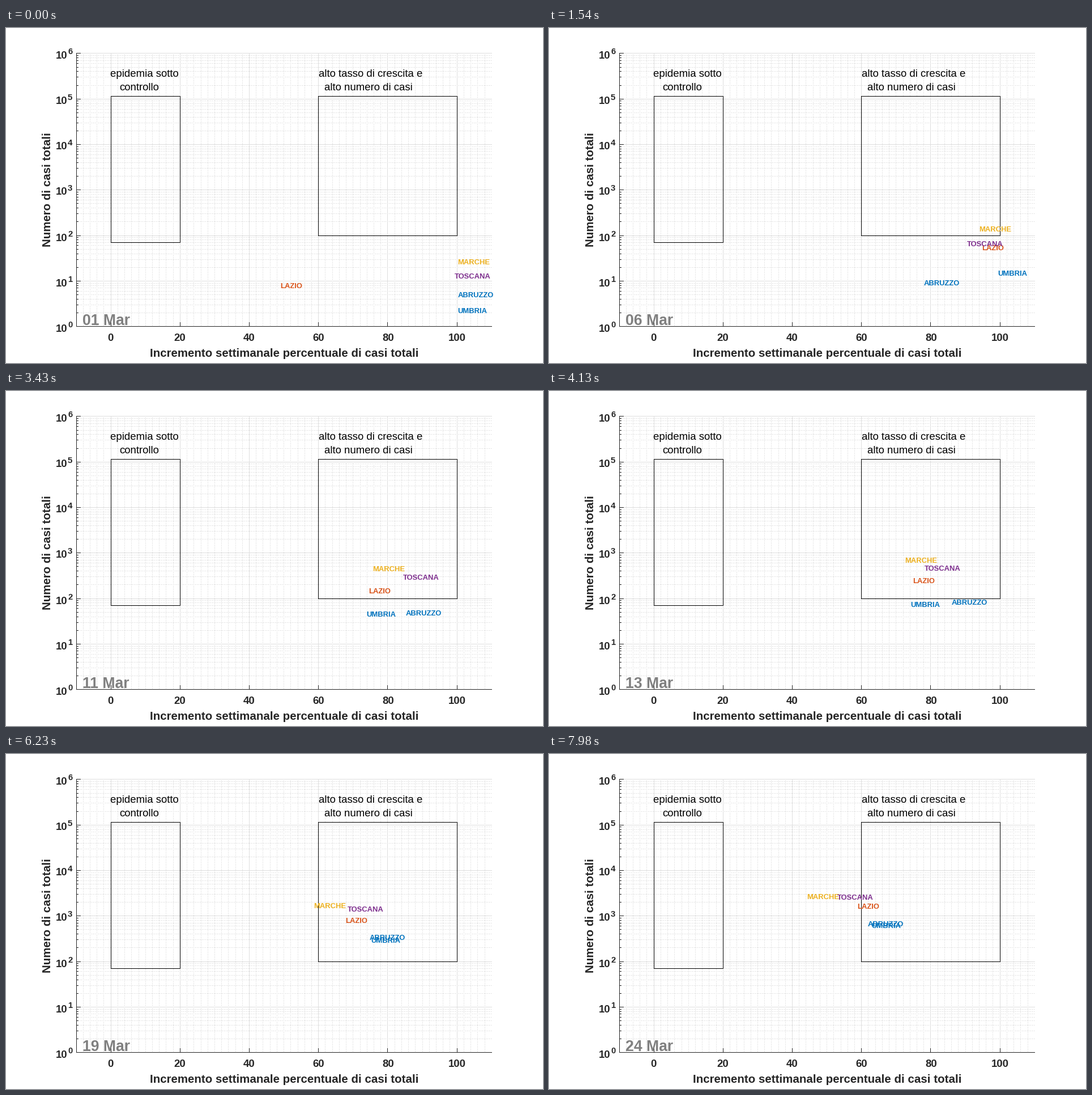
These frames come from a looping animation (948 px wide and 591 px high, 8 s). A matplotlib script:

```python
import math

import numpy as np
import matplotlib.pyplot as plt
from matplotlib.animation import FuncAnimation

W, H, DPI = 948, 591, 64
STEP = 70            # ms between position updates
TICK = 20            # ms per animation frame
LOOP = 8000          # ms per loop
STEPS_PER_DAY = 5

INK = 38
TEXT, LABEL, NAME, DATE = 18.67, 20.55, 13, 26.67   # font sizes in pixels


def px_x(v):
    return math.floor(185.15 + 6.11 * v)


def px_y(cases):
    return round(526.1 - 80.27 * math.log10(cases))


LEFT, RIGHT = px_x(-10), px_x(110)
TOP, BOTTOM = px_y(1e6), px_y(1)


def draw_chart():
    """Grid, axes and the two outlined zones as one RGB picture."""
    img = np.full((H, W, 3), 255, np.uint8)

    def hline(y, shade, x0=LEFT, x1=RIGHT, gap=1):
        img[y, x0:x1 + 1:gap] = shade

    def vline(x, shade, y0=TOP, y1=BOTTOM, gap=1):
        img[y0:y1 + 1:gap, x] = shade

    def box(x0, x1, low, high):
        l, r, t, b = px_x(x0), px_x(x1), px_y(high), px_y(low)
        for y in (t, b):
            hline(y, 0, l, r)
        for x in (l, r):
            vline(x, 0, t, b)

    minor = [m * 10 ** e for e in range(6) for m in range(2, 10)]
    decades = [10 ** e for e in range(7)]
    majors = range(0, 101, 20)

    for v in range(-8, 110, 2):
        vline(px_x(v), 205, gap=3)
    for c in minor:
        hline(px_y(c), 205, gap=3)
    for v in majors:
        vline(px_x(v), 222)
    for c in decades:
        hline(px_y(c), 222)

    box(0, 20, 70, 1.14e5)
    box(60, 100, 100, 1.14e5)

    vline(LEFT, INK)
    hline(BOTTOM, INK)
    for v in majors:
        vline(px_x(v), INK, BOTTOM - 7)
    for c in decades:
        hline(px_y(c), INK, LEFT, LEFT + 7)
    for c in minor:
        hline(px_y(c), INK, LEFT, LEFT + 3)
    return img


fig = plt.figure(figsize=(W / DPI, H / DPI), dpi=DPI, facecolor="white")
fig.figimage(draw_chart(), 0, 0, origin="upper")


def at(x, y):
    """Pixel position, y counted from the top, as figure fractions."""
    return x / W, 1 - y / H


def put(x, y, s, size, color=(INK / 255,) * 3, weight="bold", ha="left", **kw):
    return fig.text(*at(x, y), s, fontsize=size * 72 / DPI, color=color,
                    family="Liberation Sans", weight=weight, ha=ha,
                    va="baseline", **kw)


for v in range(0, 101, 20):
    put(184.8 + 6.12 * v, 552, str(v), TEXT, ha="center")
for e in range(7):
    y = px_y(10 ** e)
    put(88, y + 9.5, "10", TEXT)
    put(109, y + 2, str(e), 0.8 * TEXT)

put(491, 580.5, "Incremento settimanale percentuale di casi totali", LABEL,
    ha="center")
put(79, 285, "Numero di casi totali", LABEL, ha="center", rotation=90,
    rotation_mode="anchor")

for x, first, indent, second in (
        (184.5, "epidemia sotto", 15.5, "controllo"),
        (552, "alto tasso di crescita e", 10.4, "alto numero di casi")):
    put(x, 86.5, first, TEXT, "black", "normal")
    put(x + indent, 110.5, second, TEXT, "black", "normal")


class Path:
    """Smooth path through points reached at the shared key steps."""

    KEYS = np.array([0, 22, 37, 49, 69, 89, 114], float)

    def __init__(self, *points):
        self.p = np.array(points, float)
        self.m = np.gradient(self.p, self.KEYS, axis=0)

    def __call__(self, step):
        i = min(np.searchsorted(self.KEYS, step, "right"), len(self.KEYS) - 1)
        h = self.KEYS[i] - self.KEYS[i - 1]
        u = (step - self.KEYS[i - 1]) / h
        ease = u * u * (3 - 2 * u)
        bend = self.m[i - 1] * (1 - u) - self.m[i] * u
        return (self.p[i - 1] * (1 - ease) + self.p[i] * ease
                + h * u * (1 - u) * bend)


BLUE, ORANGE, YELLOW, PURPLE = "#0072BD", "#D95319", "#EDB120", "#7E2F8E"

REGIONS = [
    ("ABRUZZO", BLUE,
     Path((829, 470), (693, 449), (643, 426), (737, 391), (716, 358),
          (673, 323), (594, 299))),
    ("LAZIO", ORANGE,
     Path((503, 454), (783, 387), (728, 374), (659, 352), (674, 318),
          (618, 293), (563, 268))),
    ("MARCHE", YELLOW,
     Path((825, 412), (787, 354), (728, 331), (675, 313), (642, 286),
          (571, 267), (483, 251))),
    ("TOSCANA", PURPLE,
     Path((823, 437), (769, 380), (758, 348), (732, 328), (658, 298),
          (634, 273), (540, 252))),
    ("UMBRIA", BLUE,
     Path((823, 498), (818, 432), (726, 417), (662, 393), (681, 360),
          (670, 328), (595, 302))),
]

paths = [(put(0, 0, name, NAME, color, ha="center"), path)
         for name, color, path in REGIONS]
date = put(135.3, 523.5, "", DATE, "#808080")


def update(frame):
    step = (frame * TICK + TICK // 2) // STEP
    day = 1 + math.ceil(step / STEPS_PER_DAY)
    date.set_text(f"{day:02d} Mar")
    for text, path in paths:
        x, y = path(step)
        text.set_position(at(x + 0.3, y + 4.7))
    return [date] + [text for text, _ in paths]


anim = FuncAnimation(fig, update, frames=LOOP // TICK, interval=TICK,
                     init_func=lambda: update(0), repeat=True, repeat_delay=0)
plt.show()
```
